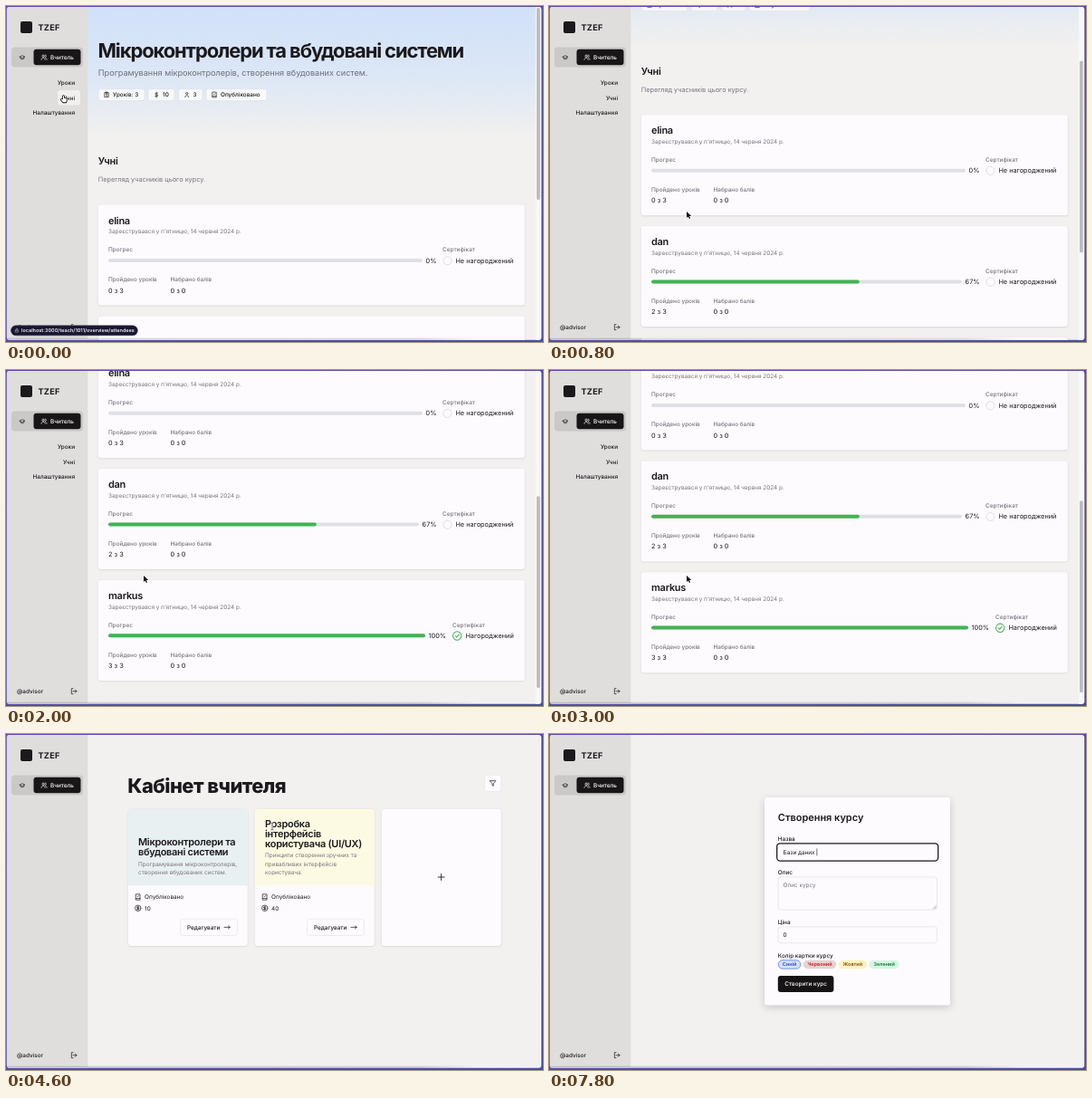
An HTML page with a canvas that plays this animation: 593x371 px, repeating every 8000 ms.

```html
<!DOCTYPE html>
<html lang="uk">
<head>
<meta charset="utf-8">
<title>Кабінет вчителя</title>
<style>
html, body { margin: 0; width: 100%; height: 100%; overflow: hidden; background: #524b9f; }
canvas { display: block; width: 593px; height: 371px; }
</style>
</head>
<body>
<canvas id="stage"></canvas>
<script>
const W = 593, H = 371, LOOP = 8000, STEP = 200;
const INK = '#1b191c', MUTED = '#77757d', WHITE = '#fdfbfe', LINE = '#e4e2e6', GREEN = '#43b354';
// Type sizes of the interface at stage scale
const XS = 5.49, SM = 6.4, MD = 7.32, LG = 9.15, XL = 10.98, HUGE = 21.96;

const canvas = document.getElementById('stage');
const ratio = window.devicePixelRatio || 1;
canvas.width = W * ratio;
canvas.height = H * ratio;
const ctx = canvas.getContext('2d');

const RING = 'M22 12a10 10 0 1 1-20 0a10 10 0 1 1 20 0';
const ICONS = {
  cap: 'M2 10l10-5 10 5-10 5zM6 12v5c3 3 9 3 12 0v-5',
  users: 'M2 21c0-9 14-9 14 0M13 8a4 4 0 1 1-8 0a4 4 0 1 1 8 0M16 4a4 4 0 0 1 0 8M18 15c3 1 4 3 4 6',
  user: 'M5 21c0-9 14-9 14 0M16 7a4 4 0 1 1-8 0a4 4 0 1 1 8 0',
  clip: 'M5 4h14v17H5zM9 2h6v4H9zM9 11h6M9 16h6',
  dollar: 'M12 2v20M17 6H10a3 3 0 0 0 0 6h4a3 3 0 0 1 0 6H6',
  book: 'M5 2h14v20H5zM5 17h14M9 9l2 2 4-4',
  coin: RING + 'M15 8h-5a2 2 0 0 0 0 4h4a2 2 0 0 1 0 4H8M12 6v12',
  exit: 'M9 3H4v18h5M9 12h12M16 7l5 5-5 5',
  arrow: 'M2 12h20M16 7l6 5-6 5',
  funnel: 'M2 3h20l-8 10v8l-4-2v-6z',
  plus: 'M12 3v18M3 12h18',
  check: RING + 'M8 12l3 3 5-6',
  lock: 'M6 11h12v9H6zM8 11V7a4 4 0 0 1 8 0v4'
};
const POINTER = 'M0 0v7l1.7-1.5 1.2 2.6 1.2-.5-1.2-2.6h2.3z';
const HAND = 'M-1.2 -3.2c0-1 1.3-1 1.3 0v2l2.2.5c.7.3.8.8.6 1.5l-.6 2.5h-3.4l-1.9-2.5c-.5-.8.4-1.4 1-.8l.8.6z';

// y is the middle of the capitals
function text(s, x, y, size, { weight = 400, color = INK, align = 'left', track = 0 } = {}) {
  ctx.font = `${weight} ${size}px Inter, sans-serif`;
  ctx.letterSpacing = `${track * size}px`;
  ctx.textAlign = align;
  ctx.fillStyle = color;
  ctx.fillText(s, x, y + size * 0.36);
}

function box(x, y, w, h, r, fill, stroke, lw = 0.6) {
  ctx.beginPath();
  ctx.roundRect(x, y, w, h, r);
  if (fill) { ctx.fillStyle = fill; ctx.fill(); }
  if (stroke) { ctx.strokeStyle = stroke; ctx.lineWidth = lw; ctx.stroke(); }
}

function shadowBox(x, y, w, h, r, blur, alpha) {
  ctx.save();
  ctx.shadowColor = `rgba(30,25,35,${alpha})`;
  ctx.shadowBlur = blur * ratio;
  ctx.shadowOffsetY = blur * 0.3 * ratio;
  box(x, y, w, h, r, WHITE);
  ctx.restore();
}

function icon(name, cx, cy, size, color = INK) {
  ctx.save();
  ctx.translate(cx - size / 2, cy - size / 2);
  ctx.scale(size / 24, size / 24);
  ctx.strokeStyle = color;
  ctx.lineWidth = 2.2;
  ctx.lineCap = ctx.lineJoin = 'round';
  ctx.stroke(new Path2D(ICONS[name]));
  ctx.restore();
}

// Piecewise linear value at t over [time, value] pairs
function track(keys, t) {
  if (t <= keys[0][0]) return keys[0][1];
  for (let i = 1; i < keys.length; i++) {
    const [t0, a] = keys[i - 1], [t1, b] = keys[i];
    if (t <= t1) return a + (b - a) * (t - t0) / (t1 - t0);
  }
  return keys[keys.length - 1][1];
}

const SCROLL = [[400, 0], [600, 42], [800, 99.3], [1200, 185], [1600, 222], [2000, 233.3], [2400, 240], [3000, 242]];
const MOUSE_X = [[200, 64], [600, 152], [3200, 152], [3800, 42], [4000, 42], [4600, 294], [4800, 294], [5800, 489], [6400, 489], [6800, 345]];
const MOUSE_Y = [[200, 103], [600, 227], [3200, 227], [3800, 25], [4000, 25], [4600, 102], [4800, 102], [5800, 159], [6400, 159], [6800, 132]];
const DASHBOARD_AT = 4000, FORM_AT = 6600, TYPE_AT = 6800;

function sidebar(menu, hover) {
  ctx.fillStyle = '#dfdedd';
  ctx.fillRect(0, 0, 90.3, H);
  box(16, 17, 13, 13, 2, INK);
  text('TZEF', 35.5, 23.5, LG, { weight: 700, track: 0.03 });
  box(6, 45.5, 79, 22, 3.5, '#cac9c8');
  icon('cap', 18, 56.7, 7);
  box(30.5, 47.7, 52, 17.5, 3, '#191618');
  icon('users', 42, 56.5, 7.3, '#fff');
  text('Вчитель', 49, 56.5, SM, { weight: 500, color: '#fff' });
  if (menu) {
    if (hover) box(57, 93, 25, 16.5, 3, '#f1f0ef');
    ['Уроки', 'Учні', 'Налаштування'].forEach((s, i) =>
      text(s, 76, 85 + i * 16.4, SM, { weight: 500, align: 'right' }));
  }
  text('@advisor', 12, 354.7, SM, { weight: 500 });
  icon('exit', 75, 354.7, 8);
}

function tag(x, w, name, label) {
  box(x, 91.6, w, 13, 3, 'rgba(251,251,252,.9)', '#dedfe3');
  icon(name, x + 9.2, 98, 7);
  text(label, x + 16, 98, SM, { weight: 500 });
}

function student(y, name, share, lessons) {
  const done = share === 1, certX = done ? 493 : 482;
  const barW = done ? 350 : share ? 343 : 347;
  shadowBox(101.8, y, 471, 111, 3, 2, 0.14);
  text(name, 113, y + 17, XL, { weight: 600, track: -0.025 });
  text("Зареєструвався у п'ятницю, 14 червня 2024 р.", 113, y + 29.5, SM, { color: MUTED });
  const label = { weight: 500, color: MUTED };
  text('Прогрес', 113, y + 49.5, SM, label);
  box(113, y + 59.4, barW, 4, 2, '#e0e0e7');
  if (share) box(113, y + 59.4, barW * share, 4, 2, GREEN);
  text(Math.round(share * 100) + '%', 113 + barW + 3.6, y + 61.4, MD);
  text('Сертифікат', certX, y + 49.5, SM, label);
  if (done) {
    icon('check', 498.2, y + 61.6, 11.2, GREEN);
  } else {
    box(482.9, y + 57, 9.2, 9.2, 4.6, null, '#d9d8dd', 0.8);
  }
  text(done ? 'Нагороджений' : 'Не нагороджений', certX + 14.4, y + 61.4, MD);
  text('Пройдено уроків', 113, y + 82.5, SM, label);
  text(`${lessons} з 3`, 113, y + 94.4, MD);
  text('Набрано балів', 181.5, y + 82.5, SM, label);
  text('0 з 0', 181.5, y + 94.4, MD);
}

function attendees(scroll) {
  ctx.save();
  ctx.translate(0, -scroll);
  const sky = ctx.createLinearGradient(0, 0, 0, 142);
  sky.addColorStop(0, '#d1e1f9');
  sky.addColorStop(0.55, '#dce7f6');
  sky.addColorStop(1, '#f1f0ef');
  ctx.fillStyle = sky;
  ctx.fillRect(90, 0, 496, 142);
  text('Мікроконтролери та вбудовані системи', 101.5, 49.3, HUGE, { weight: 700, track: -0.05 });
  text('Програмування мікроконтролерів, створення вбудованих систем.', 101.8, 73.7, LG, { color: '#6c7079' });
  tag(102, 51, 'clip', 'Уроків: 3');
  tag(157, 29, 'dollar', '10');
  tag(190.5, 26.5, 'user', '3');
  tag(221, 67, 'book', 'Опубліковано');
  text('Учні', 101.8, 171.5, XL, { weight: 600, track: -0.025 });
  text('Перегляд учасників цього курсу.', 101.8, 191.5, MD, { color: MUTED });
  student(219.6, 'elina', 0, 0);
  student(342.4, 'dan', 0.67, 2);
  student(465.2, 'markus', 1, 3);
  ctx.restore();

  ctx.fillStyle = '#f8f7f7';
  ctx.fillRect(584.8, 0, 7, H);
  box(586, 2 + scroll * 0.588, 3.8, 212, 1.9, '#bdbcbd');
}

function course(x, tint, titles, lines, price) {
  shadowBox(x, 83, 132, 151, 3.5, 2, 0.16);
  box(x, 83, 132, 84.5, [3.5, 3.5, 0, 0], tint);
  const descY = 152.4 - (lines.length - 1) * 9.2;
  titles.forEach((s, i) =>
    text(s, x + 11.2, descY - 12.8 - (titles.length - 1 - i) * 11, XL, { weight: 600, track: -0.025 }));
  lines.forEach((s, i) => text(s, x + 11.2, descY + i * 9.2, SM, { color: MUTED }));
  icon('book', x + 11, 180, 7.6);
  text('Опубліковано', x + 18.3, 180, SM);
  icon('coin', x + 11, 192.3, 7.8);
  text(price, x + 18.3, 192.3, SM);
  box(x + 57.7, 204.3, 63, 18.2, 3, WHITE, LINE);
  text('Редагувати', x + 65.2, 213.4, SM, { weight: 500 });
  icon('arrow', x + 109.3, 213.4, 7.6);
}

function dashboard() {
  text('Кабінет вчителя', 134.3, 57, HUGE, { weight: 800, track: -0.025 });
  box(528.5, 45.3, 18.3, 18.3, 3, WHITE, LINE);
  icon('funnel', 537.6, 54.5, 7.6);
  course(134.8, '#e9f0f2', ['Мікроконтролери та', 'вбудовані системи'],
    ['Програмування мікроконтролерів,', 'створення вбудованих систем.'], '10');
  course(274.8, '#fcfae2', ['Розробка', 'інтерфейсів', 'користувача (UI/UX)'],
    ['Принципи створення зручних та', 'привабливих інтерфейсів', 'користувача.'], '40');
  shadowBox(414.8, 83, 132, 151, 3.5, 2, 0.16);
  icon('plus', 480.6, 158, 9.4);
}

function badge(x, w, label, fill, color, edge) {
  box(x, 249.8, w, 9.4, 4.7, fill, edge, 0.8);
  text(label, x + w / 2, 254.5, XS, { weight: 600, color, align: 'center' });
}

function form(t) {
  const label = { weight: 500 };
  shadowBox(238, 70, 205, 229.6, 3, 8, 0.2);
  text('Створення курсу', 252.8, 92, XL, { weight: 600 });

  text('Назва', 252.8, 116, SM, label);
  box(251.7, 120.8, 178, 19.3, 3.5, WHITE, INK, 1.3);
  const typed = 'Бази даних'.slice(0, Math.max(0, Math.floor((t - TYPE_AT) / 100)));
  if (typed) text(typed, 258.6, 130.5, SM);
  else text('Назва курсу', 258.6, 130.5, SM, { color: MUTED });
  const caretX = typed ? 260.6 + ctx.measureText(typed).width : 258.6;
  ctx.fillStyle = INK;
  ctx.fillRect(caretX, 126.4, 0.6, 8);

  text('Опис', 252.8, 152.8, SM, label);
  box(253, 157.9, 175.5, 36.3, 3, WHITE, LINE, 0.8);
  text('Опис курсу', 258.6, 167, SM, { color: MUTED });
  ctx.strokeStyle = '#77757d';
  ctx.lineWidth = 0.5;
  ctx.beginPath();
  for (const d of [1.8, 3.8]) {
    ctx.moveTo(427.6 - d, 193.2);
    ctx.lineTo(427.6, 193.2 - d);
  }
  ctx.stroke();

  text('Ціна', 252.8, 208, SM, label);
  box(253, 212.9, 175.5, 18, 3, WHITE, LINE, 0.8);
  text('0', 258.6, 222, SM);

  text('Колір картки курсу', 252.8, 244.4, SM, label);
  badge(253.2, 24.6, 'Синій', '#d4e1fb', '#2b4bc4', '#5a7fd8');
  badge(280.8, 36.4, 'Червоний', '#e6d3d3', '#c02424');
  badge(319.6, 31.4, 'Жовтий', '#fcf3bd', '#854d1a');
  badge(353.4, 33.4, 'Зелений', '#d6f6e1', '#1c7440');
  box(252.8, 267, 61.6, 18, 3, '#161315');
  text('Створити курс', 283.6, 276, SM, { weight: 500, color: '#fff', align: 'center' });
}

function linkHint(path, w) {
  box(5.4, 352.8, w, 11, 5.5, '#191631', '#3a3658', 0.5);
  icon('lock', 12, 358.2, 5.6, '#c9c9d6');
  text('localhost:3000/teach/' + path, 17, 358.3, XS, { weight: 600, color: '#f1f1f6' });
}

// Soft dark strip along the window's lower edge, fading out to the right
function lowerShade() {
  const shade = ctx.createLinearGradient(0, 0, 520, 0);
  shade.addColorStop(0, 'rgba(40,40,50,.16)');
  shade.addColorStop(0.88, 'rgba(40,40,50,.16)');
  shade.addColorStop(1, 'rgba(40,40,50,0)');
  ctx.fillStyle = shade;
  ctx.fillRect(0, 366.6, 520, 3);
}

function cursor(t) {
  if (t > TYPE_AT) return;
  const x = track(MOUSE_X, t), y = track(MOUSE_Y, t);
  const hand = t <= 200 || (t >= 3800 && t <= 4000) || (t >= 5800 && t < FORM_AT);
  const beam = (t >= 4600 && t <= 4800) || t === TYPE_AT;
  ctx.save();
  ctx.translate(x, y);
  ctx.lineJoin = 'round';
  if (beam) {
    const p = new Path2D('M-1.6 -4q1.6 0 1.6 1.2v5.6q0 1.2-1.6 1.2M1.6 -4q-1.6 0-1.6 1.2M0 2.8q0 1.2 1.6 1.2');
    ctx.strokeStyle = '#fff'; ctx.lineWidth = 1.6; ctx.stroke(p);
    ctx.strokeStyle = '#333'; ctx.lineWidth = 0.7; ctx.stroke(p);
  } else {
    const p = new Path2D(hand ? HAND : POINTER);
    ctx.strokeStyle = hand ? '#111' : '#fff';
    ctx.lineWidth = hand ? 1.7 : 1.2;
    ctx.stroke(p);
    ctx.fillStyle = hand ? '#fff' : '#111';
    ctx.fill(p);
  }
  ctx.restore();
}

function draw(t) {
  ctx.setTransform(ratio, 0, 0, ratio, 0, 0);
  ctx.textRendering = 'geometricPrecision';
  const edge = ctx.createLinearGradient(0, 0, W, H);
  edge.addColorStop(0, '#5b49b4');
  edge.addColorStop(1, '#494f9c');
  ctx.fillStyle = edge;
  ctx.fillRect(0, 0, W, H);

  ctx.save();
  ctx.beginPath();
  ctx.roundRect(0.9, 1.1, 590.3, 367.6, 3);
  ctx.clip();
  ctx.fillStyle = '#f2f1f0';
  ctx.fillRect(0, 0, W, H);
  const onList = t < DASHBOARD_AT;
  if (onList) attendees(track(SCROLL, t));
  else if (t < FORM_AT) dashboard();
  else form(t);
  sidebar(onList, t <= 200);
  lowerShade();
  if (t < 600) linkHint('1011/overview/attendees', 140);
  else if (t >= 5800 && t < FORM_AT) linkHint('new', 85.5);
  ctx.restore();
  cursor(t);
}

const start = performance.now();
function tick() {
  const t = (performance.now() - start) % LOOP;
  draw(Math.floor(t / STEP) * STEP);
  requestAnimationFrame(tick);
}
tick();
</script>
</body>
</html>
```
